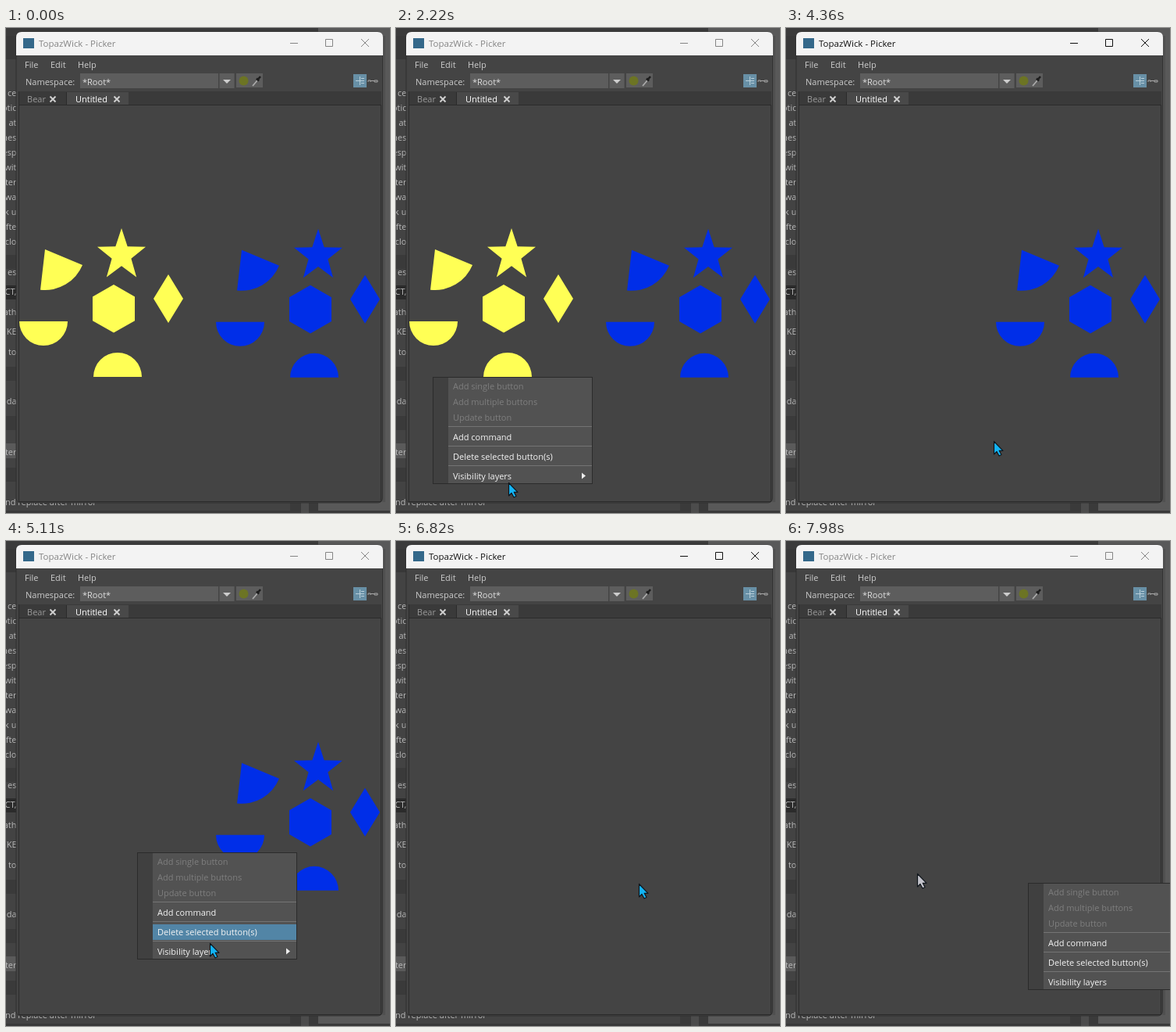
Recreate the animation shown at these times as an HTML page. Size 492 by 620 pixels, loop 8 s.

```html
<!DOCTYPE html>
<html lang="en">
<head>
<meta charset="utf-8">
<title>Picker layers</title>
<style>
html, body { margin: 0; width: 100%; height: 100%; overflow: hidden; background: #444; }
svg { display: block; width: 492px; height: 620px; }
text { font: 11px "Open Sans", "Noto Sans", sans-serif; white-space: pre; }
.title { font-size: 11.5px; }
</style>
</head>
<body>
<svg id="stage" viewBox="0 0 492 620" xmlns="http://www.w3.org/2000/svg"></svg>
<script>
const LOOP = 8000;
const stage = document.getElementById('stage');

const rect = (x, y, w, h, fill, more = '') =>
  `<rect x="${x}" y="${y}" width="${w}" height="${h}" fill="${fill}" ${more}/>`;
const text = (x, y, s, fill = '#ccc', more = '') =>
  `<text x="${x}" y="${y}" fill="${fill}" ${more}>${s}</text>`;
const line = (d, color, width = 1) =>
  `<path d="${d}" fill="none" stroke="${color}" stroke-width="${width}"/>`;

// Words cut off by the left edge of the window
const column = (words, y, step) => words.split('|')
  .map((s, i) => text(13.5, y + step * i, s, '#b8b8b8', 'text-anchor="end"')).join('');

function backdrop() {
  return rect(0, 0, 492, 620, '#434343') +
    rect(400, 0, 92, 620, '#595959') +
    rect(0, 0, 400, 10, '#3b3b3b') + rect(0, 10, 14, 30, '#383838') +
    [290, 433, 496, 562].map(y => rect(0, y, 14, 18, '#3a3a3a')).join('') +
    rect(0, 329, 14, 18, '#2b2b2b') + rect(0, 531, 14, 19, '#5a5a5a') +
    rect(482, 10, 4, 596, '#505050') + rect(0, 617, 492, 3, '#393939') +
    rect(364, 606, 36, 14, '#3a3a3a') + rect(378, 606, 10, 14, '#4c4c4c') +
    column('ce|otic|at|nes|esp|wit|ter|wa|k u|fte|clo', 87, 19) +
    column('es|CT,|ath|CKE|to', 315.5, 25.5) + column('da|ter', 481, 65) +
    text(-1, 610, 'nd replace after mirror', '#b8b8b8');
}

function frame() {
  const cross = x => line(`M${x} 87.500l7 7m0-7l-7 7`, '#d0d0d0', 1.9);
  return rect(13, 5, 469.5, 602, '#444', 'rx="6" stroke="#2c2c2c" stroke-width=".8"') +
    '<path d="M13 35V12q0-7 7-7H476q7 0 7 7V35Z" fill="#f3f3f3"/>' +
    rect(22, 13, 14, 13, '#34688a') +
    '<g id="caption">' + text(42, 24, 'TopazWick - Picker', 'currentColor', 'class="title"') +
    line('M364 19.500h10M409.500 14.500h9v9h-9zM455 14l10 10m0-10l-10 10', 'currentColor') + '</g>' +
    text(24, 51, 'File') + text(57, 51, 'Edit') + text(92, 51, 'Help') +
    text(25, 73, 'Namespace:') +
    rect(95, 58, 177, 19, '#5d5d5d') + text(98, 73, '*Root*', '#ddd') +
    rect(273.5, 58, 19, 19, '#5d5d5d') + '<path d="M278 66h10l-5 5z" fill="#ccc"/>' +
    rect(295, 58, 34, 18, '#5d5d5d') +
    '<circle cx="304.500" cy="67.500" r="6" fill="#6c7424"/>' +
    line('M316 74l6.500-7.500', '#aaa', 1.8) + line('M321 64.500l3 3M322.500 66l3.500-4', '#1d1d1d', 2.6) +
    rect(445, 59, 17, 17, '#6890a6') +
    line('M448 67.500h11M453.500 62v11M455 64.500h4M455 70.500h4', '#b9cfda') +
    line('M464 69v-2h3v2M467 67.500h5M472 67h4v2h-4z', '#a8a8a8') +
    rect(16, 81, 465, 18, '#3a3a3a') + rect(78, 82, 79, 17, '#494949') +
    line('M16.500 81V605.500H480.500V98.500H16.500M77.500 82V98', '#2b2b2b') +
    rect(17, 99, 463, 506, '#444') +
    text(27, 95, 'Bear', '#999') + cross(56.5) +
    text(89, 95, 'Untitled', '#fff') + cross(138.5);
}

// Polygon with its first corner on top; every other corner shrinks by `inner`
function poly(cx, cy, rx, ry, n, inner = 1) {
  const corners = Array.from({ length: n }, (_, i) => {
    const a = i * 2 * Math.PI / n, k = i % 2 ? inner : 1;
    return [cx + rx * k * Math.sin(a), cy - ry * k * Math.cos(a)];
  });
  return 'M' + corners.join('L') + 'Z';
}

function pie(cx, cy, r, from, to) {
  const rim = deg => [cx + r * Math.cos(deg * Math.PI / 180), cy + r * Math.sin(deg * Math.PI / 180)];
  return `M${cx} ${cy}L${rim(from)}A${r} ${r} 0 0 1 ${rim(to)}Z`;
}

const outline = poly(148, 290.5, 32.6, 34.5, 10, .4) + poly(138, 358.8, 31.2, 30.8, 6) +
  poly(208, 346, 19, 31, 4) + pie(50, 283, 52, 22.6, 96.6) +
  pie(48, 375, 31, 0, 180) + pie(143, 446, 31, 180, 360);

const shapes = (id, fill, dx, dy) =>
  `<path id="${id}" fill="${fill}" transform="translate(${dx} ${dy})" d="${outline}"/>`;

const labels = ['Add single button', 'Add multiple buttons', 'Update button',
  'Add command', 'Delete selected button(s)', 'Visibility layers'];
const LAST = labels.length - 1, ENABLED = 3;
const SUB_X = 204, SUB_Y = 116;
// Middle of a menu row; enabled rows have a divider above
const rowY = i => 12 + 20 * i + 5 * Math.max(0, i - ENABLED + 1);

function popup() {
  const rows = labels.map((s, i) => i < ENABLED
    ? text(26, rowY(i) + 4, s, '#7e7e7e')
    : rect(20, rowY(i) - 14, 184, 1, '#747474') + text(26, rowY(i) + 4, s, '#f4f4f4'));
  const layers = ['Yellow', 'Blue'].map((s, i) => {
    const y = SUB_Y + 15 + 20 * i;
    return rect(208, y - 9, 11, 11, '#2b2b2b') +
      `<g id="tick${i}">` + line(`M210.500 ${y - 4}l2.500 3l4-6`, '#eee', 1.7) + '</g>' +
      text(229, y, s, '#f4f4f4');
  });
  return '<g id="menu">' +
    rect(.5, .5, 204, 136, '#525252', 'stroke="#2b2b2b"') + rect(1, 1, 19, 135, '#404040') +
    rect(20, 0, 184, 20, '#5285a6', 'id="hover"') + rows.join('') +
    '<path d="M191 122.500l5 4l-5 4z" fill="#eee"/><g id="sub">' +
    rect(SUB_X + .5, SUB_Y - .5, 107, 41, '#525252', 'stroke="#2b2b2b"') +
    rect(SUB_X + 1, SUB_Y, 18, 40, '#404040') +
    rect(SUB_X + 19, 0, 88, 20, '#5285a6', 'id="subHover"') + layers.join('') + '</g></g>';
}

stage.innerHTML = backdrop() + frame() +
  shapes('yellow', '#ffff55', 0, 0) + shapes('blue', '#002ee8', 252, .8) + popup() +
  '<path id="cursor" d="M.5 .5V17L4 13.500L7 19L10 17.500L7.200 12.300H12Z" stroke="#10161c" stroke-width="1.200" stroke-linejoin="round"/>';

const $ = id => document.getElementById(id);
const show = (id, on) => $(id).setAttribute('display', on ? 'inline' : 'none');

// Pointer stops: arrival time, x, y
const stops = [
  [820, 477, 342], [1140, 207, 592], [1280, 22, 384], [1400, 61, 452], [1820, 47, 446],
  [2130, 135, 584], [2220, 144, 581], [2420, 186, 567], [3190, 299, 572],
  [4800, 168, 398], [5110, 261, 514], [5650, 395, 524], [5950, 412, 541],
  [6820, 311, 438], [6900, 310, 437], [7400, 352, 567], [7980, 168, 425]
];
const PACE = 3;        // ms per pixel, where there is time
const LAG = 50;        // highlight trails the pointer
const SUB_DELAY = 690;
const FIRST_CLICK = 1750;

// Each menu opens at the pointer and closes on a choice
const menus = [[1820, 3810], [4800, 6120], [6960, LOOP]];

function tip(t) {
  const i = stops.findIndex(s => s[0] > t);
  if (i < 1) return stops[i < 0 ? stops.length - 1 : 0].slice(1);
  const [t0, x0, y0] = stops[i - 1], [t1, x1, y1] = stops[i];
  const time = Math.min(t1 - t0, PACE * Math.hypot(x1 - x0, y1 - y0));
  const u = Math.max(0, 1 - (t1 - t) / time);
  const e = u * u * (3 - 2 * u);
  return [x0 + (x1 - x0) * e, y0 + (y1 - y0) * e];
}

function drawMenu(t, [open]) {
  const [mx, my] = tip(open), [px, py] = tip(t - LAG);
  const dx = px - mx, dy = py - my;
  const subOpen = t >= open + SUB_DELAY;
  const inSub = subOpen && dx >= SUB_X;
  const row = inSub ? LAST
    : labels.findIndex((_, i) => i >= ENABLED && dx >= 20 && dx < SUB_X && Math.abs(dy - rowY(i)) < 11);
  $('menu').setAttribute('transform', `translate(${mx} ${my})`);
  show('sub', subOpen);
  show('hover', row >= 0);
  show('subHover', inSub);
  $('hover').setAttribute('y', rowY(row) - 10);
  $('subHover').setAttribute('y', SUB_Y + (dy < SUB_Y + 20 ? 0 : 20));
  return dx >= 0 && dy < 141;
}

function draw(t) {
  const menu = menus.find(m => t >= m[0] && t < m[1]);
  $('caption').style.color = t >= FIRST_CLICK && !menu ? '#111' : '#858585';
  ['yellow', 'blue'].forEach((id, i) => {
    show(id, t < menus[i][1]);
    show('tick' + i, t < menus[i][1]);
  });
  show('menu', menu);
  const inside = !menu || drawMenu(t, menu);

  show('cursor', t >= stops[0][0]);
  $('cursor').setAttribute('transform', `translate(${tip(t).map(Math.round)})`);
  $('cursor').setAttribute('fill', inside ? '#14b4f4' : '#c4c4cc');
}

const start = performance.now();
function tick() {
  draw((performance.now() - start) % LOOP);
  requestAnimationFrame(tick);
}
draw(0);
requestAnimationFrame(tick);
</script>
</body>
</html>
```
